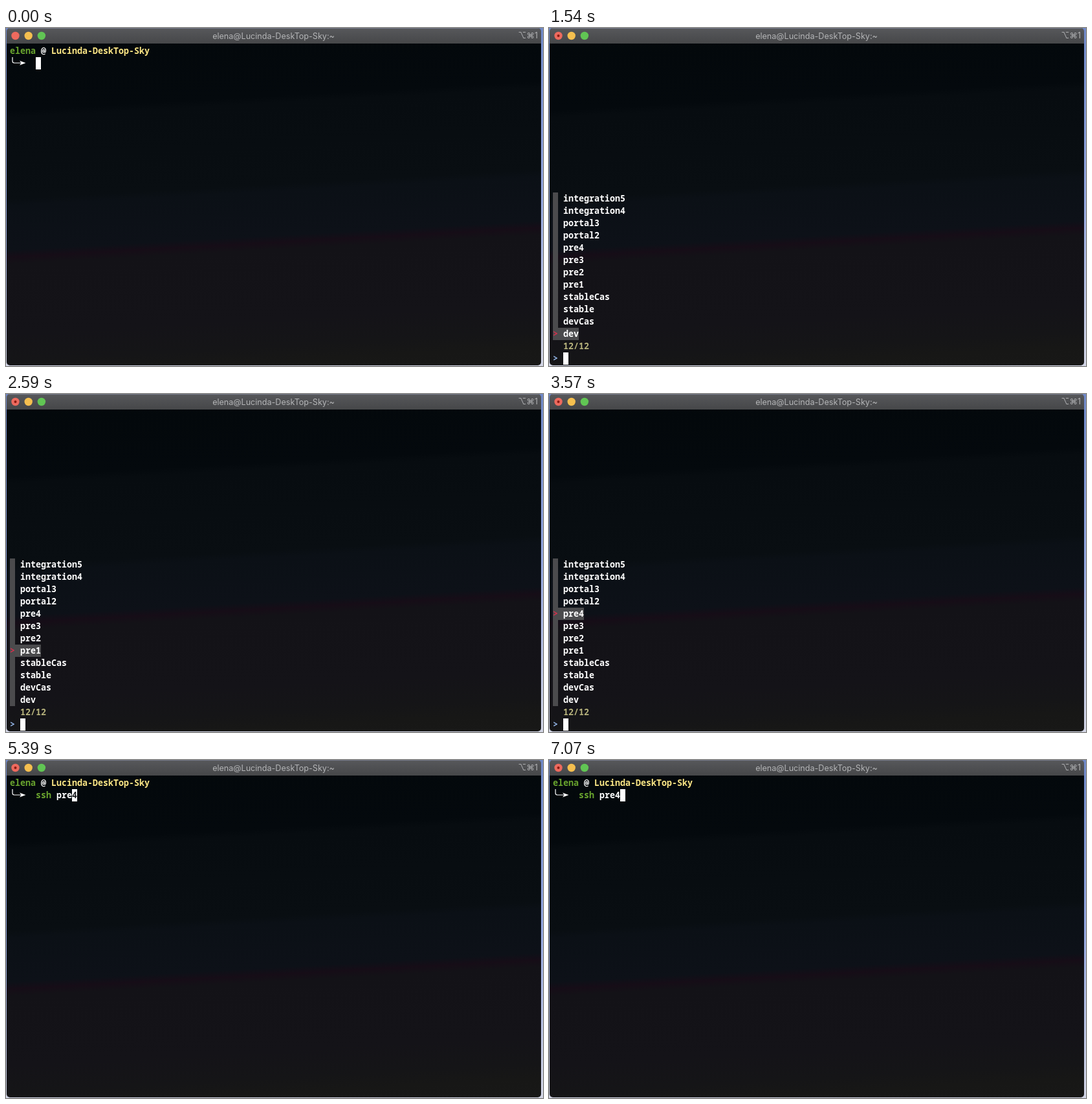
Animation of 830 by 522 pixels, one loop 7.14 s. Source, as an HTML page with a canvas:

```html
<!DOCTYPE html>
<html lang="en">
<head>
<meta charset="utf-8">
<title>Terminal host picker</title>
<style>
  html, body { margin: 0; width: 100%; height: 100%; overflow: hidden; background: #8c9fd6; }
  canvas { display: block; }
</style>
</head>
<body>
<canvas id="stage" width="830" height="522"></canvas>
<script>
const ctx = document.getElementById('stage').getContext('2d');
const LOOP = 7140;
const OPEN = 1400, STEP = 280, CLOSE = 4340, CURSOR_END = 5880;
const CELL = 8, ROW = 19, LEFT = 6, TOP = 26;
const USER = 'elena', HOST = 'Lucinda-DeskTop-Sky';
const HOSTS = ['integration5', 'integration4', 'portal3', 'portal2', 'pre4', 'pre3',
  'pre2', 'pre1', 'stableCas', 'stable', 'devCas', 'dev'];
const LIST_ROW = 12, PICKED = 4;

const colX = col => LEFT + col * CELL;
const rowY = row => TOP + row * ROW;

function box(col, row, cols, rows, color) {
  ctx.fillStyle = color;
  ctx.fillRect(colX(col), rowY(row), cols * CELL, rows * ROW);
}

// Terminal text: one character per grid cell
function put(text, col, row, color = '#fff') {
  ctx.font = '600 13.333px "Noto Sans Mono", "DejaVu Sans Mono", monospace';
  ctx.textAlign = 'left';
  ctx.fillStyle = color;
  [...text].forEach((ch, i) => ctx.fillText(ch, colX(col + i), rowY(row) + 14));
}

function disc(x, y, r, color) {
  ctx.fillStyle = color;
  ctx.beginPath();
  ctx.arc(x, y, r, 0, 2 * Math.PI);
  ctx.fill();
}

function gradient(y0, x1, y1, stops) {
  const g = ctx.createLinearGradient(0, y0, x1, y1);
  stops.forEach(([at, color]) => g.addColorStop(at, color));
  return g;
}

function drawWindow(busy) {
  // Desktop showing around the window
  ctx.fillStyle = gradient(0, 0, 522, [[0, '#6f88c8'], [.5, '#93a6df'], [1, '#d3d6e6']]);
  ctx.fillRect(0, 0, 830, 522);
  ctx.save();
  ctx.beginPath();
  ctx.roundRect(1, 0, 826, 521, 5);
  ctx.clip();

  ctx.fillStyle = gradient(24, 30, 568, [[0, '#03080b'], [.19, '#04090d'], [.21, '#070c10'],
    [.44, '#090e12'], [.46, '#0b1016'], [.585, '#0d1118'], [.605, '#160d17'], [.625, '#131217'],
    [.82, '#141318'], [.9, '#151517'], [.94, '#171716'], [1, '#181817']]);
  ctx.fillRect(0, 24, 830, 498);

  ctx.fillStyle = gradient(0, 0, 24, [[0, '#57585b'], [1, '#464749']]);
  ctx.fillRect(0, 0, 830, 24);
  ctx.fillStyle = '#737887';
  ctx.fillRect(0, 0, 830, 1);
  ctx.restore();

  ['#ed6a5e', '#f5bf4f', '#61c554'].forEach((color, i) => disc(14.5 + i * 20.2, 12, 6.2, color));
  if (busy) disc(14.5, 12, 2, '#8b1a12');

  ctx.font = '12.6px Inter, "DejaVu Sans", sans-serif';
  ctx.fillStyle = '#b4b5b7';
  ctx.textAlign = 'center';
  ctx.fillText(`${USER}@${HOST}:~`, 413.5, 17);
  ctx.font = '12.5px Inter, "DejaVu Sans", sans-serif';
  ctx.fillStyle = '#adaeb0';
  ctx.textAlign = 'right';
  ctx.fillText('⌥⌘1', 822, 16);
}

function drawPrompt() {
  put(USER, 0, 0, '#69a42e');
  put('@', 6, 0);
  put(HOST, 8, 0, '#fbe685');

  ctx.strokeStyle = ctx.fillStyle = '#fff';
  ctx.lineWidth = 1.2;
  ctx.beginPath();
  ctx.moveTo(10, 45);
  ctx.lineTo(10, 51);
  ctx.quadraticCurveTo(10, 54, 13, 54);
  ctx.lineTo(24, 54);
  ctx.stroke();
  ctx.beginPath();
  ctx.moveTo(21, 50.5);
  ctx.lineTo(30.5, 54);
  ctx.lineTo(21, 57.5);
  ctx.lineTo(23.5, 54);
  ctx.fill();
}

function drawCommand(cursorAtEnd) {
  const host = HOSTS[PICKED];
  put('ssh', 5, 1, '#69a42e');
  put(host, 9, 1);
  box(cursorAtEnd ? 13 : 12, 1, 1, 1, '#fff');
  if (!cursorAtEnd) put(host.at(-1), 12, 1, '#16181b');
}

function drawPicker(selected) {
  box(0, LIST_ROW, 1, HOSTS.length, '#4b4b4d');
  HOSTS.forEach((host, i) => {
    const row = LIST_ROW + i;
    if (i === selected) {
      box(1, row, host.length + 1, 1, '#4b4b4d');
      put('>', 0, row, '#d4304d');
    }
    put(host, 2, row);
  });
  put('12/12', 2, 24, '#b6b27c');
  put('>', 0, 25, '#92b5e6');
  box(2, 25, 1, 1, '#fff');
}

function draw(t) {
  drawWindow(t >= OPEN);
  if (t >= OPEN && t < CLOSE) {
    const moves = Math.floor((t - OPEN) / STEP);
    drawPicker(Math.max(PICKED, HOSTS.length - 1 - moves));
    return;
  }
  drawPrompt();
  if (t < OPEN) box(5, 1, 1, 1, '#fff');
  else drawCommand(t >= CURSOR_END);
}

const start = performance.now();
function tick() {
  draw((performance.now() - start) % LOOP);
  requestAnimationFrame(tick);
}
tick();
</script>
</body>
</html>
```
